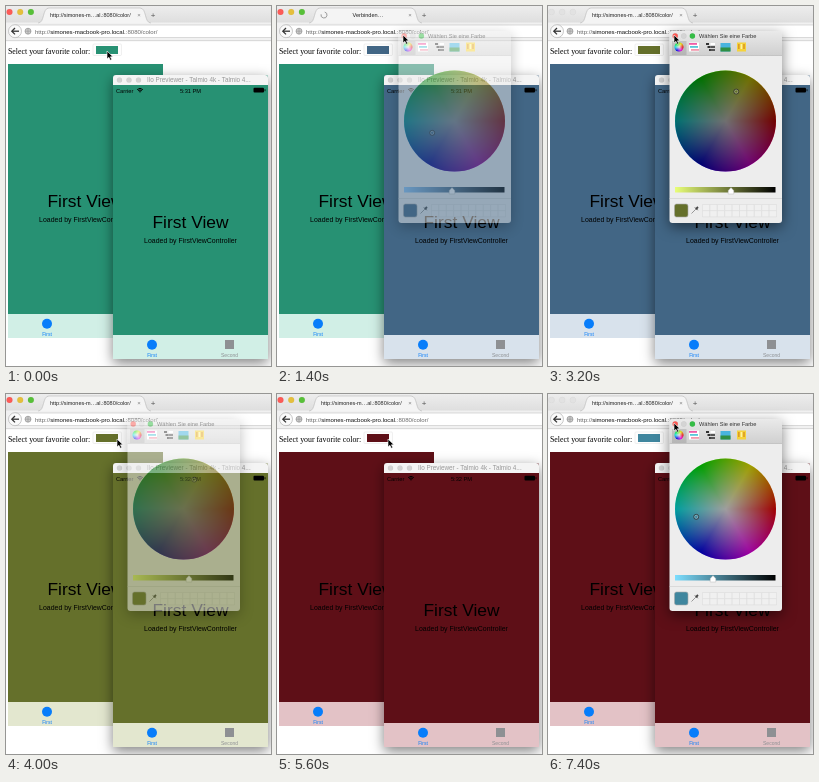
Write an HTML page with a canvas that moves like this. It is 265 by 360 pixels and loops after 7500 ms.

```html
<!DOCTYPE html>
<html lang="en">
<head>
<meta charset="utf-8">
<title>Favorite color</title>
<style>
html, body { margin: 0; width: 100%; height: 100%; overflow: hidden; background: #fff; }
canvas { display: block; width: 265px; height: 360px; }
</style>
</head>
<body>
<canvas id="stage"></canvas>
<script>
const W = 265, H = 360, LOOP = 7500, LOAD = 210, FADE = 100;
const SANS = '"Liberation Sans", Arial, sans-serif';
const SERIF = '"Liberation Serif", Times, serif';
const ratio = window.devicePixelRatio || 1;
const stage = document.getElementById('stage');
const layer = document.createElement('canvas');
for (const c of [stage, layer]) {
  c.width = W * ratio;
  c.height = H * ratio;
}
const screen2d = stage.getContext('2d');
const layer2d = layer.getContext('2d');
let g = screen2d;

const wheel = { x: 177.5, y: 115, r: 50.5 };
const field = { x: 111, y: 45 };
const closeButton = { x: 126, y: 29 };

// Each visit opens the picker, drags to a new colour and closes it again.
const green = { h: 163, s: .73, v: .57 };
const visits = [
  { open: 400, close: 1350, color: { h: 208, s: .5, v: .52 } },
  { open: 2000, close: 3280, color: { h: 70, s: .62, v: .44 } },
  { open: 3950, close: 5000, color: { h: 354, s: .84, v: .37 } },
  { open: 5850, close: LOOP, color: { h: 195, s: .6, v: .62 } }
];

function ease(from, to, t) {
  const p = Math.max(0, Math.min(1, (t - from) / (to - from)));
  return p * p * (3 - 2 * p);
}

const mix = (a, b, p) => a + (b - a) * p;
const between = (a, b, p) => ({ x: mix(a.x, b.x, p), y: mix(a.y, b.y, p) });

function markerOf({ h, s }) {
  const a = h * Math.PI / 180;
  return { x: wheel.x + Math.cos(a) * s * wheel.r, y: wheel.y - Math.sin(a) * s * wheel.r };
}

function colorAt({ x, y }, v) {
  const dx = x - wheel.x, dy = wheel.y - y;
  const h = (Math.atan2(dy, dx) * 180 / Math.PI + 360) % 360;
  return { h, s: Math.min(1, Math.hypot(dx, dy) / wheel.r), v };
}

function css({ h, s, v }) {
  const part = n => {
    const k = (n + h / 60) % 6;
    return Math.round(255 * v * (1 - s * Math.max(0, Math.min(k, 4 - k, 1))));
  };
  return `rgb(${part(5)},${part(3)},${part(1)})`;
}

function stateAt(t) {
  const s = { pointer: { x: 101, y: 45 }, phone: green, page: green, loading: false, alpha: 0 };
  let color = green, marker = markerOf(green);
  for (const { open, close, color: next } of visits) {
    const at = share => open + (close - open) * share;
    const target = markerOf(next);
    const drag = ease(at(.3), at(.55), t);
    s.pointer = between(s.pointer, marker, ease(at(.08), at(.3), t));
    s.pointer = between(s.pointer, target, drag);
    s.pointer = between(s.pointer, closeButton, ease(at(.55), at(.9), t));
    s.pointer = between(s.pointer, field, ease(close + FADE, close + 450, t));
    marker = between(marker, target, drag);
    color = colorAt(marker, mix(color.v, next.v, drag));
    s.alpha = Math.max(s.alpha, Math.min(1, (t - open) / FADE, (close + FADE - t) / FADE));
    if (t >= close) s.phone = next;
    if (t >= close + LOAD) s.page = next;
  }
  s.loading = s.phone !== s.page;
  return { ...s, color, marker };
}

function rect(x, y, w, h, fill) {
  g.fillStyle = fill;
  g.fillRect(x, y, w, h);
}

function paint(fill, stroke, width = .6) {
  if (fill) { g.fillStyle = fill; g.fill(); }
  if (stroke) { g.strokeStyle = stroke; g.lineWidth = width; g.stroke(); }
}

function round(x, y, w, h, r, fill, stroke) {
  g.beginPath();
  g.roundRect(x, y, w, h, r);
  paint(fill, stroke);
}

function arc(x, y, r, from, to, color, width) {
  g.beginPath();
  g.arc(x, y, r, from, to);
  paint(null, color, width);
}

function disc(x, y, r, fill, stroke, width) {
  g.beginPath();
  g.arc(x, y, r, 0, Math.PI * 2);
  paint(fill, stroke, width);
}

function line(points, color, width = .7) {
  g.beginPath();
  points.forEach(p => g.lineTo(...p));
  paint(null, color, width);
}

function text(s, x, y, size, color = '#000', align = 'left', family = SANS) {
  g.font = `${size}px ${family}`;
  g.fillStyle = color;
  g.textAlign = align;
  g.fillText(s, x, y);
  return x + g.measureText(s).width;
}

function vertical(y0, y1, top, bottom) {
  const grad = g.createLinearGradient(0, y0, 0, y1);
  grad.addColorStop(0, top);
  grad.addColorStop(1, bottom);
  return grad;
}

function shadowed(blur, draw) {
  g.save();
  g.shadowColor = 'rgba(0,0,0,.5)';
  g.shadowBlur = blur * ratio;
  g.shadowOffsetY = 4 * ratio;
  draw();
  g.restore();
}

function lights(x, y, gap, r, colors) {
  colors.forEach((c, i) => disc(x + i * gap, y, r, c, 'rgba(0,0,0,.08)', .4));
}

function appView(x, y, color) {
  const h = 274, bar = y + h - 24, mid = x + 77.5;
  const tint = { h: color.h, s: color.s * .17, v: .8 + color.v * .24 };
  rect(x, y, 155, h, css(color));
  rect(x, bar, 155, 24, css(tint));
  text('First View', mid, y + 143.3, 17.4, '#000', 'center');
  text('Loaded by FirstViewController', mid, y + 157.5, 6.95, '#000', 'center');
  disc(x + 39, bar + 9.7, 5, '#087dfa');
  text('First', x + 39, bar + 22, 5, '#087dfa', 'center');
  rect(x + 112, bar + 5, 9, 9, '#8e9093');
  text('Second', x + 116.5, bar + 22, 5, '#8e9093', 'center');
}

function browser(t, { page, color, loading, alpha }) {
  const inactive = ['#e2e2e2', '#e2e2e2', '#e2e2e2'];
  rect(0, 0, W, H, '#fff');
  rect(0, 0, W, 17, vertical(0, 17, '#ededed', '#dedede'));
  lights(3.5, 6, 10.7, 3, alpha === 1 ? inactive : ['#fc5b57', '#e5bf3c', '#57c038']);
  rect(0, 16.5, W, 18.5, '#f1f1f1');
  g.beginPath();
  g.moveTo(32, 17);
  g.bezierCurveTo(39, 17, 36, 2, 43, 2);
  g.lineTo(134, 2);
  g.bezierCurveTo(141, 2, 138, 17, 145, 17);
  paint('#f4f4f4', '#b5b5b5');
  if (loading) {
    arc(47, 9, 3, t / 80, t / 80 + 4.7, '#999', 1);
    text('Verbinden…', 75.5, 11, 5.6, '#222');
  } else {
    text('http://simones-m…al.:8080/color/', 44, 11, 5.5, '#222');
  }
  text('×', 133, 11, 6, '#777', 'center');
  text('+', 147, 11.5, 8, '#555', 'center');

  round(8, 19, 270, 12.5, 2, '#fff', '#c4c4c4');
  disc(9, 25.2, 6.5, '#fafafa', '#a5a5a5');
  line([[9, 22], [5.8, 25.2], [9, 28.4]], '#333', 1.3);
  line([[6, 25.2], [13, 25.2]], '#333', 1.3);
  disc(22, 25.2, 3, '#ccc', '#888');
  line([[19, 25.2], [25, 25.2]], '#888', .5);
  line([[22, 22.2], [22, 28.2]], '#888', .5);
  let x = text('http://', 29, 27.5, 6.05, '#666');
  x = text('simones-macbook-pro.local.', x, 27.5, 6.05, '#111');
  text(':8080/color/', x, 27.5, 6.05, '#666');
  rect(0, 34.5, W, .6, '#c4c4c4');

  text('Select your favorite color:', 2, 48, 7.85, '#000', 'left', SERIF);
  round(87, 38, 28.5, 11.5, 1, '#fdfdfd', '#e6e6e6');
  rect(90, 40, 22, 8, css(color));
  appView(2, 58, page);
}

function phone(t, color) {
  shadowed(13, () => round(107, 69, 155, 284, 2, css(color)));
  appView(107, 79, color);
  round(107, 69, 155, 10, [3, 3, 0, 0], '#f4f4f4');
  lights(113.5, 74, 9.5, 2.6, ['#d3d3d3', '#d3d3d3', '#d3d3d3']);
  text('Ilo Previewer - Talmio 4k - Talmio 4...', 141, 76.3, 6.35, '#999');
  text('Carrier', 110, 86.6, 5.7);
  for (let r = 1.2; r < 5; r += 1.55) arc(134, 86.8, r, -2.3, -.84, '#000', 1);
  text(t < 3800 ? '5:31 PM' : '5:32 PM', 184.5, 86.6, 5.7, '#000', 'center');
  round(247.5, 81.8, 10.5, 4.8, 1, '#000');
  rect(258.6, 83.2, .8, 2, '#000');
}

function colorWheel(x, y, r, level) {
  const hues = g.createConicGradient(0, x, y);
  for (let i = 0; i <= 6; i++) hues.addColorStop(i / 6, css({ h: 360 - i * 60, s: 1, v: 1 }));
  disc(x, y, r, hues);
  const glow = g.createRadialGradient(x, y, 0, x, y, r);
  glow.addColorStop(0, '#fff');
  glow.addColorStop(1, 'rgba(255,255,255,0)');
  disc(x, y, r, glow);
  disc(x, y, r, `rgba(0,0,0,${1 - level})`);
}

function toolIcons() {
  rect(124, 35, 14.5, 14, 'rgba(0,0,0,.13)');
  colorWheel(131, 41, 4.5, .9);
  rect(141, 36.5, 10, 9, '#fff');
  ['#ef5da8', '#58c6d8', '#f29aae'].forEach((c, i) => rect(141 + i, 37 + i * 3, 8, 1.8, c));
  for (let i = 0; i < 3; i++) {
    rect(158 + i * 1.5, 37 + i * 3, 3, 2, '#333');
    rect(162.5, 37 + i * 3, 4.5, 2, i ? '#555' : '#fff');
  }
  rect(172.5, 37, 10, 8.5, '#49b4df');
  rect(172.5, 41.5, 10, 4, '#2f8f45');
  rect(189, 36.5, 9, 9, '#f5d33b');
  for (let i = 0; i < 3; i++) rect(190 + i * 2.6, 38, 1.6, 5, i % 2 ? '#fff3a0' : '#dd9a25');
}

function picker({ color, marker }) {
  const { h, s, v } = color;
  shadowed(14, () => round(121.5, 25, 112.5, 192, 3, '#ededed'));
  round(121.5, 25, 112.5, 24.5, [3, 3, 0, 0], vertical(25, 49, '#eaeaea', '#d0d0d0'));
  rect(121.5, 49.2, 112.5, .6, '#b5b5b5');
  lights(127.2, 30, 8.6, 2.7, ['#f95b55', '#d4d4d4', '#35bd46']);
  text('Wählen Sie eine Farbe', 151, 32.1, 5.65, '#333');
  toolIcons();

  colorWheel(wheel.x, wheel.y, wheel.r, v);
  disc(marker.x, marker.y, 2.5, null, '#333', .8);
  disc(marker.x, marker.y, 1.6, null, 'rgba(255,255,255,.6)', .5);

  const ramp = g.createLinearGradient(127, 0, 227.5, 0);
  ramp.addColorStop(0, css({ h, s: s * .85, v: 1 }));
  ramp.addColorStop(1, '#000');
  rect(127, 181, 100.5, 5.5, ramp);
  const knob = 127 + (1 - v) * 100;
  g.beginPath();
  g.moveTo(knob, 181.5);
  g.lineTo(knob + 2.8, 184.5);
  g.lineTo(knob + 2.8, 188);
  g.lineTo(knob - 2.8, 188);
  g.lineTo(knob - 2.8, 184.5);
  g.closePath();
  paint('#fff', '#aaa', .4);

  rect(121.5, 192, 112.5, .6, '#cfcfcf');
  round(126.5, 198, 13.5, 13, 2, css(color), '#aaa');
  line([[143.5, 207.5], [148, 203]], '#999', 1);
  line([[147, 201.5], [149.7, 204.2]], '#444', 1);
  line([[148, 203], [150, 201]], '#444', 1.8);
  for (let i = 0; i < 20; i++) {
    round(154.5 + (i % 10) * 7.4, 198.5 + Math.floor(i / 10) * 6.2, 7.4, 6.2, 0, '#f0f0f0', '#dcdcdc');
  }
}

// Painted on its own layer so that the whole panel fades as one.
function fadingPicker(state) {
  g = layer2d;
  g.setTransform(ratio, 0, 0, ratio, 0, 0);
  g.clearRect(0, 0, W, H);
  picker(state);
  g = screen2d;
  g.globalAlpha = state.alpha;
  g.drawImage(layer, 0, 0, W, H);
  g.globalAlpha = 1;
}

function pointer({ x, y }) {
  g.beginPath();
  [[0, 0], [0, 8], [1.9, 6.3], [3.3, 9.3], [4.7, 8.6], [3.4, 5.8], [5.9, 5.7]]
    .forEach(([dx, dy]) => g.lineTo(x + dx, y + dy));
  g.closePath();
  paint('#000', '#fff');
}

function draw(t) {
  const state = stateAt(t);
  g.setTransform(ratio, 0, 0, ratio, 0, 0);
  browser(t, state);
  phone(t, state.phone);
  if (state.alpha > 0) fadingPicker(state);
  pointer(state.pointer);
}

const start = performance.now();
function tick(now) {
  draw(Math.max(0, now - start) % LOOP);
  requestAnimationFrame(tick);
}
tick(start);
</script>
</body>
</html>
```
